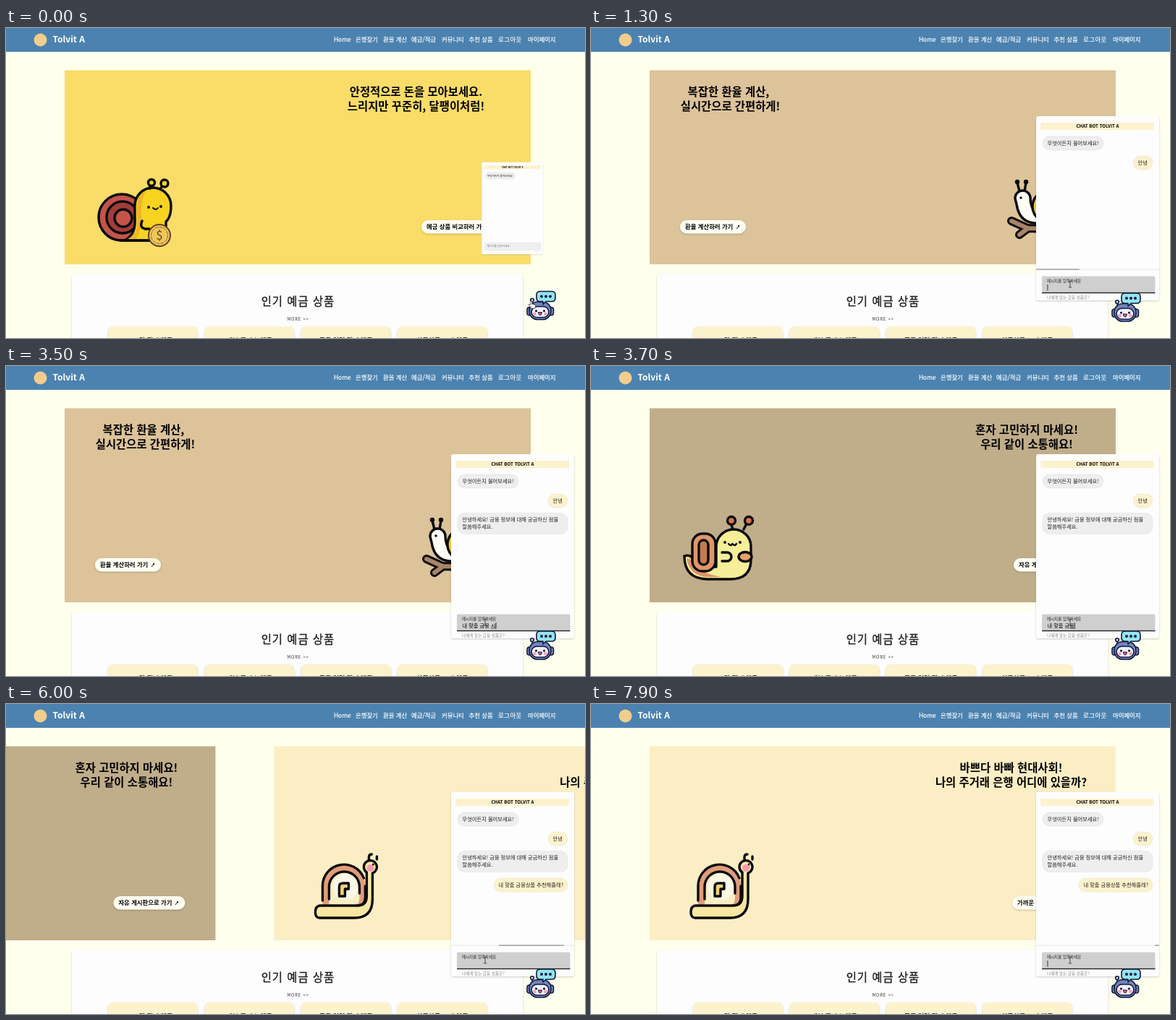
An HTML page that plays this animation: 800x429 px, repeating every 8000 ms.

```html
<!DOCTYPE html>
<html lang="ko">
<head>
<meta charset="utf-8">
<style>
html, body { margin: 0; width: 100%; height: 100%; overflow: hidden; background: #feffed; }
svg { display: block; width: 800px; height: 429px; font-family: "Noto Sans CJK KR", "Noto Sans KR", sans-serif; }
text { white-space: pre; }
.ink { stroke: #0b0b0b; stroke-width: 3.4; stroke-linecap: round; stroke-linejoin: round; }
.shade { filter: drop-shadow(0 1px 1px #0003); }
.medium { stroke: currentColor; stroke-width: .022em; }
</style>
</head>
<body>
<svg id="stage" viewBox="0 0 800 429"></svg>
<script>
// y is the middle of the line
const text = (x, y, s, size, more = '') =>
  `<text x="${x}" y="${y + size * .37}" font-size="${size}" ${more}>${s}</text>`;
const box = (x, y, w, h, fill, r = 0, more = '') =>
  `<rect x="${x}" y="${y}" width="${w}" height="${h}" rx="${r}" fill="${fill}" ${more}/>`;
const dot = (x, y, r, fill, more = '') =>
  `<circle cx="${x}" cy="${y}" r="${r}" fill="${fill}" ${more}/>`;
const path = (d, fill = 'none', more = '') => `<path d="${d}" fill="${fill}" ${more}/>`;
const BOLD = 'font-weight="700"', MID = 'text-anchor="middle"', BARE = 'stroke="none"';
const TITLE = `${BOLD} ${MID}`;

const coinSnail =
  dot(160, 262, 32, '#c4544a') + dot(161, 262, 22, '#a23c3a') + dot(162, 263, 12, '#c4544a') +
  path('M164 294Q180 286 178 262V246A25 25 0 0 1 228 246Q228 262 221 268V294Z', '#f8d31f') +
  path('M168 292Q184 284 181 262V246Q182 230 193 226Q186 236 187 262Q186 284 180 292Z', '#eeb52c', BARE) +
  path('M133 279Q142 294 160 294H200M199 222q-1-4 1-5M213 223l3-5M188 267q-4 9 4 11h6') +
  dot(201, 214, 4.5, '#f8d31f') + dot(219, 215, 5, '#f8d31f') +
  dot(197, 248, 2, '#111', BARE) + dot(214, 247, 2, '#111', BARE) +
  path('M203 249q4 4 7 0', 'none', 'style="stroke-width:2"') +
  dot(212, 287, 15, '#f0c65a', 'style="stroke:#5f4028;stroke-width:2"') +
  dot(212, 287, 11.5, 'none', 'style="stroke:#8a6235;stroke-width:1;stroke-dasharray:4 2"') +
  text(212, 287, '$', 17, `${MID} ${BARE} fill="#5f4028"`);

const branch = 'M581 267l22 10 30 1 38-6M604 277l-12 9';
const branchSnail =
  path(branch, 'none', 'style="stroke-width:12"') +
  path(branch, 'none', 'style="stroke:#a98467;stroke-width:6"') +
  path('M592 226l-3-12M599 226l2-12') + dot(589, 213, 1.5, '#111') + dot(601, 213, 1.5, '#111') +
  path('M586 236A10.5 10.5 0 0 1 607 235Q607 252 620 260H656Q670 264 676 270H620Q592 272 588 244Z', '#fffdf6') +
  dot(632, 247, 22, '#f5cb42') + path('M632 261a13 13 0 1 1 11-15q-1 9-10 7') +
  dot(594, 235, 1.8, '#111', BARE);

const roundSnail =
  path('M194 220l2 6M214 220l-3 6') + dot(194, 214, 5.5, '#d9774f') + dot(218, 214, 5.5, '#d9774f') +
  path('M129 263Q139 260 142 270Q146 278 173 278V250A24 24 0 0 1 221 250V268Q221 295 192 295H160Q129 294 129 263Z', '#f6ee98') +
  path('M132 266Q136 291 162 292H180Q146 286 139 268Z', '#dd9468', BARE) +
  box(140, 232, 32, 52, '#e0956b', 14) + box(149, 241, 13, 34, '#c77a50', 6.5) +
  path('M181 258h7a6 6 0 0 1 0 12h-7') + '<ellipse cx="213" cy="264" rx="9" ry="6.5" fill="#e8a06c"/>' +
  dot(185, 244, 2, '#111', BARE) + dot(206, 244, 2, '#111', BARE) +
  path('M190 246q3 4 5.5 0q3 4 5.5 0', 'none', 'style="stroke-width:2.4"');

const archSnail =
  path('M148 279V252A29.5 29.5 0 0 1 207 252V279Z', '#e19d7a', BARE) +
  path('M157 279V253A21 21 0 0 1 199 253V268Q199 279 190 279Z', '#fbeec4', BARE) +
  dot(180, 253, 18, '#fcf8e6', BARE) +
  path('M148 272V252A29.5 29.5 0 0 1 205 241M207 252V268Q207 279 196 279M157 270V253A21 21 0 0 1 199 253V262') +
  path('M171 266v-13q0-5 5-5h8v8h-5v10z', '#f2d37a') +
  path('M212 215v-3q0-4 4-4M223 215v-4') +
  path('M144 279H196Q209 279 209 266V233A9 9 0 1 1 217 234V270Q217 296 192 296H144Q138 296 138 288T144 279Z', '#f8e6a2') +
  dot(214, 227, 5, '#f79ab4', BARE) + dot(218, 222, 1.5, '#111', BARE);

const slides = [
  ['#fadc68', 566.5, 566.5, '안정적으로 돈을 모아보세요.', '느리지만 꾸준히, 달팽이처럼!', 574, 118, '예금 상품 비교하러 가기', coinSnail],
  ['#dcc39a', 190, 192.5, '복잡한 환율 계산,', '실시간으로 간편하게!', 123, 91, '환율 계산하러 가기', branchSnail],
  ['#c0ad8a', 602, 602, '혼자 고민하지 마세요!', '우리 같이 소통해요!', 584, 99, '자유 게시판으로 가기', roundSnail],
  ['#fbeec4', 580.5, 580.5, '바쁘다 바빠 현대사회!', '나의 주거래 은행 어디에 있을까?', 582, 110, '가까운 은행 찾으러 가기', archSnail]
].map(([fill, x1, x2, line1, line2, bx, bw, label, art], i) => `<g transform="translate(${i * 725})">
  ${box(81, 58.5, 644, 268.5, fill)}
  ${text(x1, 88.5, line1, 15.4, TITLE)}${text(x2, 108, line2, 15.4, TITLE)}
  ${box(bx, 266, bw, 18.5, '#fffff4', 9.25, 'class="shade"')}
  ${text(bx + 7, 275.3, label + ' <tspan font-size="6.5" dx="1">↗</tspan>', 8.4, BOLD)}
  <g class="ink">${art}</g></g>`).join('');

const nav = [[453, 'Home'], [483, '은행찾기'], [521, '환율 계산'], [560, '예금/적금'], [602, '커뮤니티'],
  [639.5, '추천 상품'], [680, '로그아웃', .5], [721, '마이페이지']]
  .map(([x, s, gap = 0]) => text(x, 16, s, 8.4, `class="medium" fill="#fff" color="#fff" letter-spacing="${gap}"`)).join('');

const products = ['도담 정기 예금', '새봄 플러스 예금', '푸른 언덕 정기 예금', '차곡차곡 모아 예금']
  .map((s, i) => box(141 + i * 133.3, 413, 124, 40, '#fcf2cc', 7, 'class="shade"') +
    text(203 + i * 133.3, 432.5, s, 9, TITLE + ' fill="#333"')).join('');

const GREY = '#eeeeee', CREAM = '#fcf2cc';
const bubble = (at, x, y, w, fill, ...lines) => `<g data-at="${at}">` +
  box(x, y, w, 9 + 10 * lines.length, fill, 9.5, 'stroke="#0000000c"') +
  lines.map((s, i) => text(x + 6.5, y + 9.3 + i * 10, s, 7.25, 'fill="#222"')).join('') + '</g>';
const SENT = [1188, 5336], REPLY = 2200, FOCUS = 600;

const chat = box(615, 122, 170, 255, '#fdfdfd', 3, 'class="shade"') +
  box(621.5, 131, 156.5, 10, CREAM) +
  text(700, 136, 'CHAT BOT TOLVIT A', 6.2, TITLE) +
  bubble(0, 624, 150, 84, GREY, '무엇이든지 물어보세요!') +
  bubble(SENT[0], 749, 177, 27, CREAM, '안녕') +
  bubble(REPLY, 624, 203.5, 152, GREY, '안녕하세요! 금융 정보에 대해 궁금하신 점을', '말씀해주세요.') +
  bubble(SENT[1], 674, 241, 102, CREAM, '내 맞춤 금융상품 추천해줄래?') +
  `<g id="loader">${box(615, 333.7, 170, .8, '#dedede')}<g id="bars">${box(0, 333.3, 0, 1.5, '#a2a2a2').repeat(2)}</g></g>
  <g id="idle">${box(623, 343.5, 156, 24, '#efefef', 2)}${text(630, 354.5, '메시지를 입력하세요', 7.25, 'fill="#777"')}</g>
  <g id="active">${box(623, 343.5, 156.5, 23.5, '#cfcfcf', 2)}${box(623, 365.8, 156.5, 1.4, '#222')}
    ${text(630, 350, '메시지를 입력하세요', 5.5, 'fill="#222"')}
    ${text(630, 372.5, '나에게 맞는 금융 상품은?', 5.6, 'fill="#888"')}
    ${text(630.5, 359, '', 7.25, 'id="entry"')}
    ${box(0, 362.6, 6.5, .7, '#222', 0, 'id="compose"')}${box(0, 355, .9, 8.5, '#222', 0, 'id="caret"')}
    ${path('M653 363h28', 'none', 'id="squiggle" stroke="#e33" stroke-dasharray="1.5 .8"')}</g>`;

const NAVY = '#101b3c';
const robot = `<g stroke="${NAVY}" stroke-width="1.6" stroke-linejoin="round" stroke-linecap="round">
  ${path('M727 385v-5')}${dot(727, 379, 2.3, '#d6def5')}
  ${box(720, 389, 7, 11, '#7f8fc4', 3)}${box(749.5, 389, 7, 11, '#7f8fc4', 3)}
  ${box(723, 381.5, 30, 24.5, '#7484bd', 11.5)}${box(726, 388, 24, 15, '#f1f0fb', 7.5)}
  ${dot(732.5, 394, .8, NAVY)}${dot(743.5, 394, .8, NAVY)}${path('M735.5 396h5q-.5 4-2.5 4t-2.5-4z', '#ef5f78', 'stroke-width="1"')}
  ${dot(730.5, 398, 2.3, '#ff9db2', BARE)}${dot(745.5, 398, 2.3, '#ff9db2', BARE)}
  ${path('M738 367h16q5 0 5 5v4q0 5-5 5h-8l-4 4v-4h-4q-5 0-5-5v-4q0-5 5-5z', '#93e4ef')}
  ${[740, 746, 752].map(x => dot(x, 374, 1.2, NAVY)).join('')}</g>`;

document.getElementById('stage').innerHTML =
  box(0, 0, 800, 429, '#feffed') +
  `<g id="track">${slides}</g>` +
  box(0, 0, 800, 33, '#4c82b0') + dot(47.5, 16.5, 9, '#f1cd8c') +
  text(64.5, 16, 'Tolvit A', 12, BOLD + ' fill="#fff"') + nav +
  box(91, 340, 623.5, 120, '#fdfdfd', 5, 'class="shade"') +
  text(403.5, 378.5, '인기 예금 상품', 15.4, MID + ' class="medium" letter-spacing="1" fill="#222" color="#222"') +
  text(403.5, 402.3, 'MORE &gt;&gt;', 6, MID + ' letter-spacing=".7" fill="#334"') + products +
  `<g id="chat">${chat}</g><g id="robot">${robot}</g>` +
  `<g id="hand" stroke="#222" stroke-width=".7">${path('M-1-5q1.5-1 2 0v4l4 1q1 1 0 5h-5l-4-5q0-2 3 0z', '#fff')}</g>` +
  path('M659.8 350h1.7l.5.5.5-.5h1.7M662 350.5v8M659.8 359h1.7l.5-.5.5.5h1.7', 'none', 'id="beam" stroke="#222" stroke-width=".8"');

const $ = id => document.getElementById(id);
const show = (el, on) => el.style.display = on ? '' : 'none';
const clamp = x => Math.max(0, Math.min(1, x));

// cubic-bezier(.25, .1, .25, 1)
function ease(x) {
  let lo = 0, hi = 1, s;
  for (let i = 0; i < 20; i++) {
    s = (lo + hi) / 2;
    if (.75 * s * (1 - s) + s ** 3 < x) lo = s; else hi = s;
  }
  return .3 * (1 - s) ** 2 * s + 3 * (1 - s) * s * s + s ** 3;
}

// one entry per keystroke, 100 ms apart
const hello = 'ㅇ|아|안|안ㄴ|안녕'.split('|');
const ask = ['ㄴ', '내', '내 마', '내 맞', '내 맞추', '내 맞춤', '내 맞춤 그', '내 맞춤 금유',
  ...'| 시| ||ㅅ|사|상|상푸|상품|상품 ㅊ|상품 추|상품 추처|상품 추천|상품 추천해|상품 추천해주|상품 추천해줄|상품 추천해줄ㄹ|상품 추천해줄래|상품 추천해줄래?'
    .split('|').map(s => '내 맞춤 금융' + s)];
function typed(t) {
  const [keys, start, end] = t < SENT[0] ? [hello, 700, SENT[0]] : [ask, 2600, SENT[1]];
  if (t < start || t >= end) return '';
  return keys[Math.min(keys.length - 1, Math.floor((t - start) / 100))];
}

function drawEntry(t) {
  show($('idle'), t < FOCUS);
  show($('active'), t >= FOCUS);
  const s = typed(t), entry = $('entry');
  entry.textContent = s;
  const end = 630.5 + (s ? entry.getComputedTextLength() : 0);
  const since = t - (t >= SENT[1] ? SENT[1] : t >= SENT[0] ? SENT[0] : FOCUS);
  $('caret').setAttribute('x', end);
  $('compose').setAttribute('x', end - 6.6);
  show($('caret'), s || since % 424 < 212);
  show($('compose'), /[^ ?]$/.test(s));
  show($('squiggle'), s.includes('상품 '));
}

function drawLoader(t) {
  const start = t >= SENT[1] ? SENT[1] : SENT[0];
  show($('loader'), t >= SENT[1] || (t >= SENT[0] && t < REPLY));
  const phase = Math.max(0, t - start) % 875 / 875;
  const long = ease(clamp((phase - .6) / .4)), short = ease(clamp(phase / .6));
  [[-.9 + 1.9 * long, 1.35 * long], [-2 + 3.07 * short, 1.08 * short]].forEach(([a, b], i) => {
    const bar = $('bars').children[i];
    bar.setAttribute('x', 615 + 170 * clamp(a));
    bar.setAttribute('width', 170 * (clamp(b) - clamp(a)));
  });
}

function draw(t) {
  const turn = t + 1241.72;
  const slide = Math.floor(turn / 2400) - 1 + ease(clamp(turn % 2400 / 120));
  $('track').setAttribute('transform', `translate(${-725 * slide})`);
  const scale = .5 + .5 * clamp(t / 100);
  $('chat').setAttribute('transform', `translate(699.5 249.5) scale(${scale}) translate(-699.5 -249.5)`);
  document.querySelectorAll('[data-at]').forEach(el => show(el, t >= el.dataset.at));
  drawEntry(t);
  drawLoader(t);
  const move = ease(clamp((t - 200) / 300));
  $('hand').setAttribute('transform', `translate(${726 - 64 * move} ${383 - 29 * move})`);
  show($('hand'), t < 500);
  show($('beam'), t >= 500);
  $('robot').setAttribute('transform', `translate(0 ${-2.5 * (1 - clamp((t - 200) / 100))})`);
}

const begin = performance.now();
function tick() {
  draw(Math.floor((performance.now() - begin + 5) / 100) * 100 % 8000);
  requestAnimationFrame(tick);
}
tick();
</script>
</body>
</html>
```
